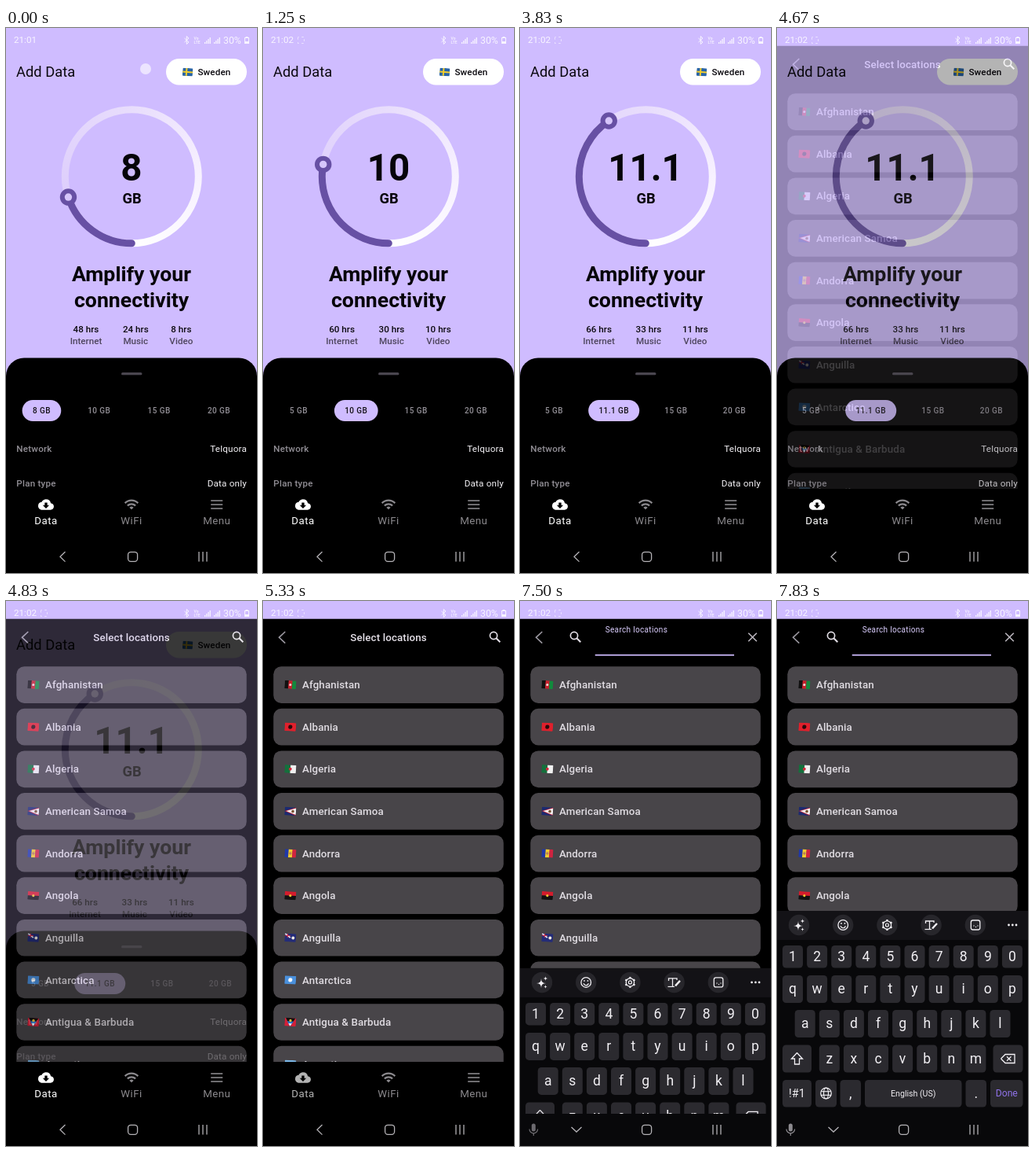
An HTML page with a canvas for the animation above (8000 ms loop, 320 px wide and 693 px high).

```html
<!DOCTYPE html>
<html lang="en">
<head>
<meta charset="utf-8">
<title>Add Data</title>
<style>
html, body { margin: 0; width: 100%; height: 100%; overflow: hidden; background: #000; }
canvas { position: absolute; left: 0; top: 0; width: 320px; height: 693px; }
</style>
</head>
<body>
<canvas id="home"></canvas><canvas id="list"></canvas><canvas id="top"></canvas>
<script>
const W = 320, H = 693, LOOP = 8000, TAU = Math.PI * 2;
const LILAC = '#cfbcff', PURPLE = '#6750a4', GREY = '#918e95';
const dpr = window.devicePixelRatio || 1;

const layers = {};
for (const id of ['home', 'list', 'top']) {
  const el = document.getElementById(id);
  el.width = W * dpr;
  el.height = H * dpr;
  layers[id] = el.getContext('2d');
}
let c = layers.home;

function use(id) {
  c = layers[id];
  c.setTransform(dpr, 0, 0, dpr, 0, 0);
  c.globalAlpha = 1;
  c.clearRect(0, 0, W, H);
}

const clamp = v => Math.max(0, Math.min(1, v));
const mix = (a, b, p) => a + (b - a) * p;
const span = (t, a, b) => clamp((t - a) / (b - a));
const smooth = p => p * p * (3 - 2 * p);

// cubic-bezier(.4, 0, .2, 1)
function ease(x) {
  let lo = 0, hi = 1;
  for (let i = 0; i < 20; i++) {
    const s = (lo + hi) / 2, r = 1 - s;
    if (1.2 * r * r * s + 0.6 * r * s * s + s ** 3 < x) lo = s; else hi = s;
  }
  return 3 * (1 - lo) * lo * lo + lo ** 3;
}

function font(size, weight = 400, ls = 0) {
  c.font = `${weight} ${size}px Roboto, sans-serif`;
  c.letterSpacing = ls + 'px';
}

function text(s, x, y, size, color, { w = 400, align = 'left', ls = 0 } = {}) {
  font(size, w, ls);
  c.textAlign = align;
  c.fillStyle = color;
  c.fillText(s, x, y);
}

function width(s, size, weight, ls) {
  font(size, weight, ls);
  return c.measureText(s).width;
}

function box(x, y, w, h, r, color) {
  c.fillStyle = color;
  c.beginPath();
  c.roundRect(x, y, w, h, r);
  c.fill();
}

function disc(x, y, r, color) {
  c.fillStyle = color;
  c.beginPath();
  c.arc(x, y, r, 0, TAU);
  c.fill();
}

function arc(x, y, r, a, b, color, lw) {
  c.strokeStyle = color;
  c.lineWidth = lw;
  c.beginPath();
  c.arc(x, y, r, a, b);
  c.stroke();
}

function line(color, lw, ...p) {
  c.strokeStyle = color;
  c.lineWidth = lw;
  c.beginPath();
  for (let i = 0; i < p.length; i += 2) c.lineTo(p[i], p[i + 1]);
  c.stroke();
}

// ---- icons ----

const cloud = new Path2D('M19.35 10.04A7.49 7.49 0 0 0 12 4C9.11 4 6.6 5.64 5.35 8.04A5.994 5.994 0 0 0 0 14c0 3.31 2.69 6 6 6h13c2.76 0 5-2.24 5-5 0-2.64-2.05-4.78-4.65-4.96zM17 13l-5 5-5-5h3V9h4v4h3z');

function cloudIcon(x, y, color) {
  c.save();
  c.translate(x - 10, y - 10);
  c.scale(0.833, 0.833);
  c.fillStyle = color;
  c.fill(cloud);
  c.restore();
}

function wifiIcon(x, y, color) {
  const a = Math.PI * 1.25, b = Math.PI * 1.75;
  arc(x, y + 7, 11.8, a, b, color, 2.3);
  arc(x, y + 7, 7.2, a, b, color, 2.3);
  c.fillStyle = color;
  c.beginPath();
  c.moveTo(x, y + 6.8);
  c.arc(x, y + 6.8, 3.7, a, b);
  c.fill();
}

function menuIcon(x, y, color) {
  for (const d of [-5, 0, 5]) line(color, 1.6, x - 7.5, y + d, x + 7.5, y + d);
}

function searchIcon(x, y, color) {
  arc(x - 2, y - 2, 4.6, 0, TAU, color, 1.7);
  line(color, 2, x + 1.3, y + 1.3, x + 6.3, y + 6.3);
}

function closeIcon(x, y, color) {
  line(color, 1.6, x - 5.3, y - 5.3, x + 5.3, y + 5.3);
  line(color, 1.6, x + 5.3, y - 5.3, x - 5.3, y + 5.3);
}

function star(x, y, r, color) {
  c.fillStyle = color;
  c.beginPath();
  c.moveTo(x, y - r);
  for (const [dx, dy] of [[r, 0], [0, r], [-r, 0], [0, -r]]) c.quadraticCurveTo(x, y, x + dx, y + dy);
  c.fill();
}

// Bands run across (v) or down (h); extra(w, h) adds the emblem.
function flag(x, y, w, h, dir, bands, extra) {
  c.save();
  c.translate(x, y);
  c.transform(1, 0.06, -0.08, 1, 0.5, -0.4);
  c.beginPath();
  c.roundRect(0, 0, w, h, 1);
  c.clip();
  const n = bands.length;
  bands.forEach((b, i) => {
    c.fillStyle = b;
    if (dir === 'v') c.fillRect(w * i / n, 0, w / n + 0.3, h);
    else c.fillRect(0, h * i / n, w, h / n + 0.3);
  });
  if (extra) extra(w, h);
  c.restore();
}

const spot = (color, r = 2) => (w, h) => disc(w / 2, h / 2, r, color);

function wedge(color, ...p) {
  c.fillStyle = color;
  c.beginPath();
  for (let i = 0; i < p.length; i += 2) c.lineTo(p[i], p[i + 1]);
  c.fill();
}

const places = [
  ['Afghanistan', 'v', ['#111', '#c8202c', '#128a3c'], spot('#e8d8d4', 1.6)],
  ['Albania', 'h', ['#e0202c'], spot('#2a0a0c', 2.6)],
  ['Algeria', 'v', ['#14703c', '#f0f0f0'], spot('#d0283c', 1.9)],
  ['American Samoa', 'h', ['#1c2a70'], (w, h) => {
    wedge('#c02838', 0, h / 2, w, 0, w, h);
    wedge('#f2f2f2', 2, h / 2, w, 1, w, h - 1);
    disc(w * 0.72, h / 2, 1.8, '#7a5030');
  }],
  ['Andorra', 'v', ['#2038a8', '#f0cc30', '#d02440'], spot('#b88058', 1.7)],
  ['Angola', 'h', ['#d41c2c', '#111'], spot('#e8c030', 1.6)],
  ['Anguilla', 'h', ['#242c78'], (w, h) => {
    line('#e8e8f0', 1.6, 0, 0, w / 2, h / 2);
    line('#d03048', 1, 0, h / 4, w / 2, h / 4);
    line('#d03048', 1, w / 4, 0, w / 4, h / 2);
    disc(w * 0.74, h / 2, 2, '#f0e8e0');
  }],
  ['Antarctica', 'h', ['#4a90dc'], spot('#f2f6fa', 2.6)],
  ['Antigua & Barbuda', 'h', ['#d42038'], (w, h) => {
    wedge('#111', 1, 0, w - 1, 0, w / 2, h);
    wedge('#2878c8', 3, h * 0.4, w - 3, h * 0.4, w / 2, h);
    wedge('#f2f2f2', 5, h * 0.66, w - 5, h * 0.66, w / 2, h);
    disc(w / 2, h * 0.3, 1.6, '#f0c830');
  }],
  ['Argentina', 'h', ['#7cb8e8', '#f4f4f4', '#7cb8e8'], spot('#e8c040', 1.2)],
];

// ---- home ----

const CX = 160.3, CY = 188.8, R = 85;
const angle = gb => Math.PI / 2 + (gb - 5) * 24 * Math.PI / 180;

const TAP = 1055;
const drag = [[2440, 10], [2830, 13.6], [3040, 14.2], [3230, 14], [3780, 11.1]];

function amount(t) {
  if (t < TAP) return 8;
  let v = 10;
  for (let i = 1; i < drag.length; i++) {
    const [a, va] = drag[i - 1], [b, vb] = drag[i];
    if (t >= a) v = mix(va, vb, smooth(span(t, a, b)));
  }
  return v;
}

function dial(knobGb) {
  const g = c.createConicGradient(Math.PI / 2, CX, CY);
  g.addColorStop(0, '#d8c8fd');
  g.addColorStop(0.25, '#dfd0fc');
  g.addColorStop(0.5, '#e8ddfc');
  g.addColorStop(0.75, '#f7f1ff');
  g.addColorStop(1, '#ffffff');
  arc(CX, CY, R, 0, TAU, g, 9);
  const a = angle(knobGb);
  c.lineCap = 'round';
  arc(CX, CY, R, Math.PI / 2, a, PURPLE, 9);
  c.lineCap = 'butt';
  const x = CX + R * Math.cos(a), y = CY + R * Math.sin(a);
  disc(x, y, 10.7, PURPLE);
  disc(x, y, 4.7, '#d6c6fb');
}

function usage(gb) {
  const cols = [['Internet', 6], ['Music', 3], ['Video', 1]].map(([name, k]) => {
    const hrs = Math.floor(gb * k + 1e-6) + ' hrs';
    return { name, hrs, w: Math.max(width(name, 11.67, 500, 0), width(hrs, 11.67, 500, 0)) };
  });
  const gap = 26.67;
  let x = 160 - (cols.reduce((s, q) => s + q.w, 0) + 2 * gap) / 2;
  for (const q of cols) {
    const mid = x + q.w / 2;
    text(q.hrs, mid, 387.3, 11.67, '#0c0a10', { w: 500, align: 'center' });
    text(q.name, mid, 401.5, 11.67, '#4e465e', { w: 500, align: 'center' });
    x += q.w + gap;
  }
}

function chips(label, sel) {
  const names = ['5 GB', '10 GB', '15 GB', '20 GB'];
  names[sel] = label + ' GB';
  const ws = names.map(n => width(n, 10, 500, 0.417) + 26.67);
  const gap = (W - ws.reduce((a, b) => a + b)) / 5;
  let x = gap;
  names.forEach((n, i) => {
    if (i === sel) box(x, 473, ws[i], 27, 13.5, LILAC);
    text(n, x + 13.33, 490, 10, i === sel ? '#151218' : GREY, { w: 500, ls: 0.417 });
    x += ws[i] + gap;
  });
}

function infoRow(name, value, y) {
  text(name, 13.3, y, 11.67, GREY, { w: 500, ls: 0.208 });
  text(value, 307, y, 11.67, '#f4f2f6', { align: 'right', ls: 0.208 });
}

function touch(x, y, alpha) {
  c.globalAlpha = alpha;
  disc(x, y, 7, '#fff');
  c.globalAlpha = 1;
}

function drawHome(t) {
  use('home');
  c.fillStyle = LILAC;
  c.fillRect(0, 0, W, H);
  text('Add Data', 13, 62, 18.33, '#0b090f');
  box(204, 39, 103, 33.5, 16.75, '#fff');
  flag(225, 51, 13, 10, 'h', ['#2864a8'], (w, h) => {
    line('#f0cc30', 2, 0, h / 2, w, h / 2);
    line('#f0cc30', 2, 5, 0, 5, h);
  });
  text('Sweden', 244.5, 60, 11.67, '#0b090f', { w: 500, ls: 0.083 });

  const gb = amount(t), shown = String(Math.round(gb * 10) / 10);
  const knob = t < 2000 ? mix(8, 10, ease(span(t, TAP, TAP + 500))) : gb;
  dial(knob);
  text(shown, 160, 194, 47.5, '#060409', { w: 700, align: 'center' });
  text('GB', 160.5, 223, 18.33, '#060409', { w: 700, align: 'center' });
  text('Amplify your', 160, 321.7, 26.67, '#060409', { w: 700, align: 'center' });
  text('connectivity', 160, 355, 26.67, '#060409', { w: 700, align: 'center' });
  usage(+shown);

  box(0, 419.5, W, 300, 23, '#000');
  box(147, 438, 26.5, 3.3, 1.7, '#4a464f');
  chips(shown, t < TAP ? 0 : 1);
  infoRow('Network', 'Telquora', 539);
  infoRow('Plan type', 'Data only', 583);

  if (t < 240) touch(mix(178, 164, t / 240), 52, 0.6 * (1 - span(t, 90, 240)));
  if (t > 930 && t < 1130) touch(138, 479, 0.4);
  if (t > 2420 && t < 3790) {
    const a = angle(knob) - 0.1;
    touch(CX + 71 * Math.cos(a), CY + 71 * Math.sin(a), 0.62);
  }
}

// ---- locations ----

function header(t) {
  const e = ease(span(t, 5850, 6270)), f = ease(span(t, 7280, 7430));
  line('#9b98a0', 1.6, 28.3, 39, 20.5, 46.3, 28.3, 53.6);
  c.globalAlpha = 1 - e;
  text('Select locations', 160, 50.8, 13.33, '#e6e1e9', { w: 500, align: 'center', ls: 0.125 });
  c.globalAlpha = 1;
  const sx = mix(296, 71, e);
  searchIcon(sx, 46, '#e2dee5');
  if (!e) return;
  c.globalAlpha = e;
  closeIcon(296.5, 46, '#bab6bd');
  c.save();
  c.beginPath();
  c.rect(sx + 24.5, 24, Math.max(0, 273 - sx - 24.5), 50);
  c.clip();
  text('Search locations', sx + 37.7, mix(50.5, 40, f), mix(13.33, 10, f), '#dccfff', { ls: mix(0.417, 0.333, f) });
  const lw = mix(1, 1.7, f);
  c.fillStyle = f > 0.5 ? LILAC : '#c4bfc9';
  c.fillRect(sx + 24.5, 69.6 - lw, 250, lw);
  c.restore();
  c.globalAlpha = 1;
}

function drawList(t) {
  use('list');
  const p = ease(span(t, 4480, 5180));
  c.canvas.style.opacity = p;
  if (!p) return;
  c.fillStyle = '#000';
  c.fillRect(0, 22.5, W, 563.5);
  header(t);
  c.save();
  c.beginPath();
  c.rect(0, 75, W, 511);
  c.clip();
  places.forEach(([name, dir, bands, extra], i) => {
    const y = 83.2 + i * 53.62;
    box(13.3, y, 293.4, 46.7, 10, '#484549');
    flag(27.5, y + 18, 14.5, 10.5, dir, bands, extra);
    text(name, 50, y + 28, 13.33, '#e0dce2', { w: 500, ls: 0.125 });
  });
  c.restore();
}

// ---- status bar, navigation, keyboard ----

function statusBar(t) {
  c.fillStyle = LILAC;
  c.fillRect(0, 0, W, 22.5);
  const ink = '#f8f4ff';
  text(t < 450 ? '21:01' : '21:02', 10, 19.3, 11.67, ink);
  if (t >= 450) {
    c.globalAlpha = 0.7;
    c.setLineDash([2.5, 3.5]);
    c.lineDashOffset = 1.2;
    c.strokeStyle = ink;
    c.lineWidth = 1;
    c.strokeRect(44.5, 11.5, 8, 8);
    c.setLineDash([]);
    c.globalAlpha = 1;
  }
  line(ink, 1, 227.5, 13, 233, 18, 230.3, 20.5, 230.3, 10.5, 233, 13, 227.5, 18);
  text('Vo', 239.5, 15, 5, ink, { w: 500 });
  text('LTE', 239.5, 19.5, 5, ink, { w: 500 });
  for (const x of [253, 265]) {
    for (let i = 0; i < 4; i++) {
      c.fillStyle = ink;
      c.fillRect(x + i * 2.2, 18 - i * 2, 1.3, 2 + i * 2);
    }
  }
  text('30%', 277, 19.5, 12.3, ink);
  c.strokeStyle = ink;
  c.lineWidth = 1;
  c.strokeRect(304.5, 12.5, 5, 7);
  c.fillStyle = ink;
  c.fillRect(305.5, 11, 3, 1.5);
  c.fillRect(305, 17, 4, 2);
}

function bottomNav(t) {
  c.fillStyle = '#000';
  c.fillRect(0, 586, W, H - 586);
  const v = Math.round(mix(255, 142, span(t, 5180, 5400)));
  const data = `rgb(${v},${v},${v})`, rest = '#8b898d';
  cloudIcon(51, 606, data);
  wifiIcon(160, 605.5, rest);
  menuIcon(268.7, 606, rest);
  [['Data', 51, data], ['WiFi', 160, rest], ['Menu', 268.7, rest]].forEach(([s, x, col]) =>
    text(s, x, 631, 13.33, col, { align: 'center', ls: 0.417 }));
}

function systemNav(k) {
  const ink = '#b4b2b6';
  if (k > 0) {
    line(ink, 1.3, 65.5, 669, 72, 675, 78.5, 669);
    c.globalAlpha = k;
    box(14.8, 664.5, 5, 10, 2.5, '#8d8b90');
    arc(17.3, 671.5, 5.3, 0, Math.PI, '#8d8b90', 1.2);
    line('#8d8b90', 1.2, 17.3, 677, 17.3, 680);
    c.globalAlpha = 1;
  } else {
    line(ink, 1.3, 75.5, 666, 69, 672.3, 75.5, 678.6);
  }
  c.strokeStyle = ink;
  c.lineWidth = 1.3;
  c.beginPath();
  c.roundRect(155.6, 666.3, 12, 12, 3.5);
  c.stroke();
  for (const x of [246, 251, 256]) line(ink, 1.3, x, 666, x, 678.5);
}

const KEY = '#2b2a2f', INK = '#f2f0f4';

function key(s, x, y, w, h, size = 17.5, color = INK) {
  box(x, y, w, h, 4.5, KEY);
  if (s) text(s, x + w / 2, y + h / 2 + size * 0.34, size, color, { align: 'center' });
}

function keyRow(s, x, y, h) {
  [...s].forEach((ch, i) => key(ch, x + i * 31.1 - 13, y, 26, h));
}

function toolbar() {
  for (let i = 0; i < 5; i++) disc(28 + i * 56.2, 412, 13.2, '#27262b');
  star(27, 413, 6, INK);
  star(32.5, 407, 3, INK);
  star(32.5, 417.5, 2.2, INK);
  arc(84.2, 412, 6.3, 0, TAU, INK, 1.3);
  arc(84.2, 412.5, 3.2, 0.2, Math.PI - 0.2, INK, 1.2);
  disc(82, 410, 0.9, INK);
  disc(86.4, 410, 0.9, INK);
  arc(140.4, 412, 2, 0, TAU, INK, 1.2);
  arc(140.4, 412, 5.2, 0, TAU, INK, 1.3);
  for (let i = 0; i < 6; i++) {
    const a = i * TAU / 6 + Math.PI / 6, x = Math.cos(a), y = Math.sin(a);
    line(INK, 2.2, 140.4 + 5 * x, 412 + 5 * y, 140.4 + 7 * x, 412 + 7 * y);
  }
  line(INK, 1.3, 189.5, 410, 189.5, 407, 200, 407, 200, 409);
  line(INK, 1.3, 194.5, 407, 194.5, 417);
  line(INK, 2.4, 198, 416.5, 204, 410);
  line(INK, 1.2, 188.5, 417.5, 197, 417.5);
  c.strokeStyle = INK;
  c.lineWidth = 1.3;
  c.beginPath();
  c.roundRect(247.3, 406, 11.5, 12, 2.5);
  c.stroke();
  for (const [x, y] of [[251, 413], [253.5, 414.5], [256, 413]]) disc(x, y, 0.7, INK);
  for (const x of [295.5, 300.3, 305]) disc(x, 412, 1.4, INK);
}

function keyboard(k) {
  c.save();
  c.translate(0, (1 - k) * 300);
  c.fillStyle = '#08080a';
  c.fillRect(0, 394, W, 320);
  c.fillStyle = '#131216';
  c.fillRect(0, 394, W, 37);
  toolbar();
  keyRow('1234567890', 20, 438, 28.5);
  keyRow('qwertyuiop', 20, 476, 35);
  keyRow('asdfghjkl', 35.7, 520, 35);
  keyRow('zxcvbnm', 66.8, 564.5, 35);

  key('', 7, 564.5, 37, 35);
  line(INK, 1.3, 25.5, 574.5, 18.5, 582, 22.5, 582, 22.5, 589, 28.5, 589, 28.5, 582, 32.5, 582, 25.5, 574.5);
  key('', 275.5, 564.5, 38, 35);
  line(INK, 1.3, 285.5, 582, 291, 576.5, 303, 576.5, 303, 587.5, 291, 587.5, 285.5, 582);
  line(INK, 1.3, 293, 579.3, 298.5, 584.8);
  line(INK, 1.3, 298.5, 579.3, 293, 584.8);

  key('!#1', 7, 609, 37, 34.5, 14.5);
  key('', 49, 609, 27, 34.5);
  arc(62.5, 626, 6.8, 0, TAU, INK, 1.2);
  c.beginPath();
  c.ellipse(62.5, 626, 3, 6.8, 0, 0, TAU);
  c.stroke();
  line(INK, 1.1, 56, 623.7, 69, 623.7);
  line(INK, 1.1, 56, 628.3, 69, 628.3);
  key(',', 80.5, 609, 26.5, 34.5);
  key('English (US)', 112, 609, 123.5, 34.5, 10.6);
  key('.', 240.5, 609, 26.5, 34.5);
  key('Done', 272, 609, 41.5, 34.5, 12.2, '#8f72e8');
  c.restore();
}

function drawTop(t) {
  use('top');
  const k = ease(span(t, 7330, 7680));
  statusBar(t);
  bottomNav(t);
  if (k > 0) keyboard(k);
  c.fillStyle = k > 0 ? '#08080a' : '#000';
  c.fillRect(0, 652, W, 41);
  systemNav(k);
}

let start;
function tick(now) {
  start ??= now;
  const t = (now - start) % LOOP;
  drawHome(t);
  drawList(t);
  drawTop(t);
  requestAnimationFrame(tick);
}
requestAnimationFrame(tick);
</script>
</body>
</html>
```
